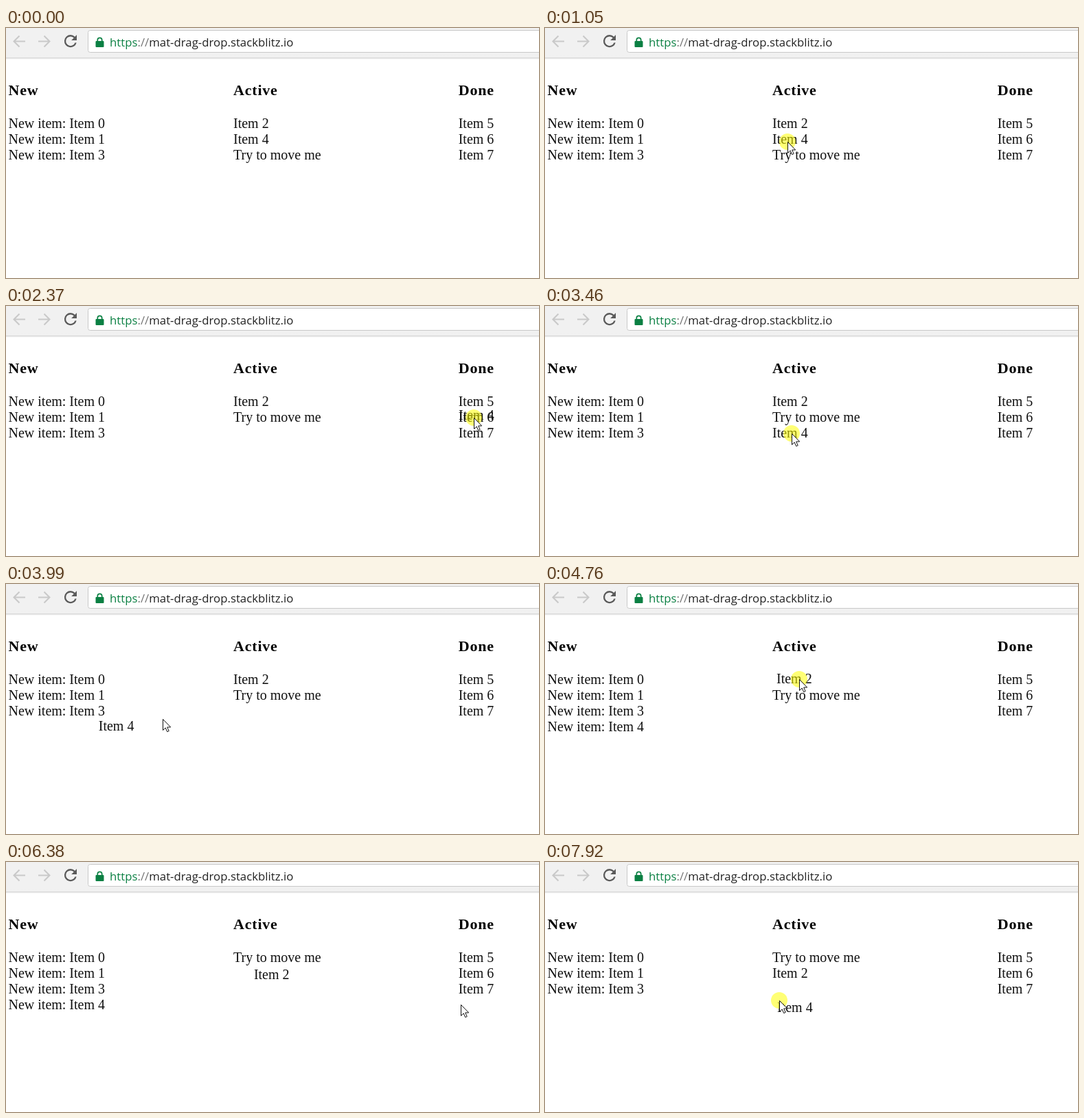
An HTML page that plays this animation: 776 px wide and 365 px high, repeating every 8 s.

```html
<!DOCTYPE html>
<html lang="en">
<head>
<meta charset="utf-8">
<title>Drag and drop board</title>
<style>
  html, body { margin: 0; width: 100%; height: 100%; overflow: hidden; background: #fff; }
  svg { display: block; width: 776px; height: 365px; }
  .url { font: 16.8px "Open Sans", "Noto Sans", sans-serif; fill: #222; }
  .board { font: 20px "Liberation Serif", "Times New Roman", serif; fill: #111; }
  .title { font-size: 22px; font-weight: bold; letter-spacing: .8px; fill: #000; }
  .nav { fill: none; stroke: #c9c9c9; stroke-width: 2; }
</style>
</head>
<body>
<svg viewBox="0 0 776 365">
  <defs>
    <linearGradient id="shade" x2="0" y2="1">
      <stop stop-color="#d2d2d2"/>
      <stop offset="1" stop-color="#fff"/>
    </linearGradient>
  </defs>

  <rect width="776" height="43" fill="#f1f1f1"/>
  <rect y="43" width="776" height="3" fill="url(#shade)"/>
  <path class="nav" d="M28 19.5H12M19.5 11.5l-8 8 8 8M47 19.5H63M55.5 11.5l8 8-8 8"/>
  <path fill="#5a5a5a" transform="translate(80.4 5.6) scale(1.13)"
    d="M17.65 6.35A8 8 0 0 0 12 4a8 8 0 1 0 7.73 10h-2.08A6 6 0 1 1 12 6c1.66 0 3.14.69 4.22 1.78L13 11h7V4z"/>
  <rect x="119.5" y="3.5" width="680" height="32" rx="3" fill="#fff" stroke="#c8c8c8"/>
  <rect x="130.5" y="19" width="12" height="9" rx="1" fill="#0b8043"/>
  <path d="M133.3 20v-2.5a3.2 3.2 0 0 1 6.4 0V20" fill="none" stroke="#0b8043" stroke-width="1.7"/>
  <text class="url" x="151" y="27"><tspan fill="#0b8043">https</tspan><tspan fill="#777">://</tspan>mat-drag-drop.stackblitz.io</text>

  <g class="board" id="board"></g>

  <g id="cursor">
    <circle id="press" r="12" fill="#ff0" opacity=".54"/>
    <path d="M.5.5V16.5l3.7-3.5 2.5 5.7 2.5-1.1-2.5-5.6h5z" fill="#fff" stroke="#111"/>
  </g>
</svg>

<script>
const LOOP = 8000, STEP = 77, PHASE = 49, SETTLE = 570;
const NEW = 3.5, ACTIVE = 331, DONE = 658.7;
const $ = id => document.getElementById(id);
const row = n => 123 + 23 * n;
const mix = (a, b, p) => a + (b - a) * p;
const ease = p => p * p * (3 - 2 * p);

// Pointer strokes: start, end, goal x, goal y, vertical bow
const strokes = [
  [220, 880, 353, 166, 0],
  [1050, 1830, 717, 160, -14],
  [1910, 2350, 681, 163, -16],
  [2400, 2667, 458, 193, 30],
  [2700, 3130, 359, 186, 0],
  [3440, 3850, 200, 208, 0],
  [3850, 4340, 370, 139, 0],
  [4750, 5500, 724, 180, 10],
  [5600, 5850, 663, 178, -30],
  [5850, 6000, 662, 208, 0],
  [6380, 6900, 120, 202, 30],
  [7364, 7900, 341, 202, 12]
];

function pointer(t) {
  let x = 558, y = 372;
  for (const [from, to, goalX, goalY, bow] of strokes) {
    if (t < from) break;
    const p = ease(Math.min(1, (t - from) / (to - from)));
    x = mix(x, goalX, p);
    y = mix(y, goalY, p) + bow * Math.sin(Math.PI * p);
  }
  return [x, y];
}

// dx, dy: where the pointer grips the text; col, n: the slot it settles in
const drags = [
  { id: "four", grab: 1050, drop: 2667, dx: -22, dy: 3, col: ACTIVE, n: 3 },
  { id: "four", grab: 3437, drop: 3850, dx: -28, dy: 6, col: NEW, n: 4 },
  { id: "two", grab: 4746, drop: 5850, dx: -33, dy: 6, col: ACTIVE, n: 2 },
  { id: "four", grab: 7364, drop: LOOP, dx: -3, dy: 17 }
];
const home = { two: 1, four: 2 };

function itemAt(id, t) {
  const d = drags.filter(d => d.id === id && d.grab <= t).pop();
  if (!d) return { x: ACTIVE, y: row(home[id]) };
  const [px, py] = pointer(Math.min(t, d.drop));
  const x = px + d.dx, y = py + d.dy;
  if (t < d.drop) return { x, y, held: true };
  const p = Math.min(1, (t - d.drop) / SETTLE);
  return { x: mix(x, d.col, p), y: mix(y, row(d.n), p), listed: p === 1 && d.col === NEW };
}

function addText(x, y, label, title) {
  const el = document.createElementNS("http://www.w3.org/2000/svg", "text");
  el.textContent = label;
  if (title) el.setAttribute("class", "title");
  return $("board").appendChild(place(el, x, y));
}

function place(el, x, y) {
  el.setAttribute("x", x);
  el.setAttribute("y", y);
  return el;
}

const columns = [
  [NEW, "New", "New item: Item ", [0, 1, 3]],
  [ACTIVE, "Active", "", []],
  [DONE, "Done", "Item ", [5, 6, 7]]
];
for (const [x, title, prefix, ids] of columns) {
  addText(x, 98, title, true);
  ids.forEach((id, i) => addText(x, row(i + 1), prefix + id));
}
const note = addText(ACTIVE, row(3), "Try to move me");
const items = {
  two: addText(ACTIVE, row(1), "Item 2"),
  four: addText(ACTIVE, row(2), "Item 4")
};

function draw(now) {
  // The picture advances in even ticks
  const t = Math.max(0, Math.floor((now % LOOP - PHASE) / STEP) * STEP + PHASE);
  let pressed = false;
  for (const id in items) {
    const { x, y, held, listed } = itemAt(id, t);
    place(items[id], x, y);
    if (id === "four") items[id].textContent = listed ? "New item: Item 4" : "Item 4";
    pressed = pressed || held;
  }
  // The note moves up as each item above it leaves the column
  place(note, ACTIVE, row(3 - (t > 1270) - (t > 4970)));
  $("cursor").setAttribute("transform", `translate(${pointer(t).map(Math.round)})`);
  $("press").setAttribute("visibility", pressed ? "visible" : "hidden");
  requestAnimationFrame(draw);
}
draw(0);
</script>
</body>
</html>
```
